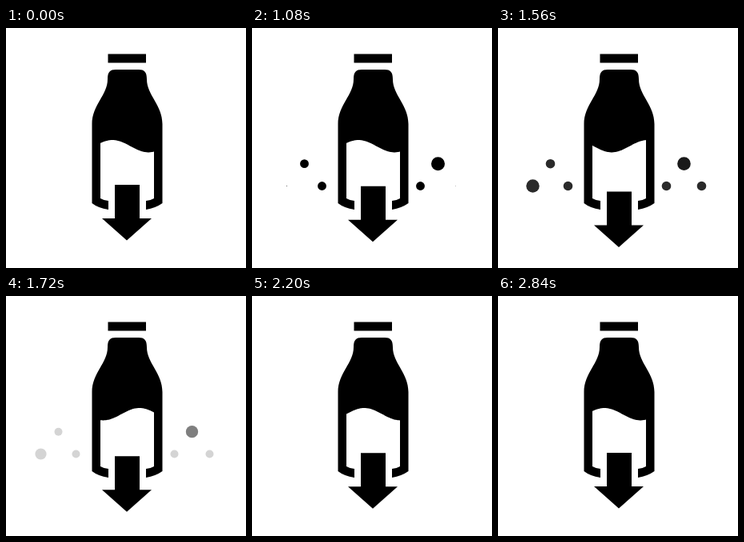
Animation of 300x300 px, one loop 2.88 s. Source, as an HTML page:

```html
<!DOCTYPE html>
<html>
<head>
<meta charset="utf-8">
<style>
  html, body { margin: 0; height: 100%; overflow: hidden; background: #fff; }
  svg { display: block; width: 100%; height: 100%; filter: blur(.6px); }
</style>
</head>
<body>
<svg viewBox="0 0 300 300">
  <rect x="127.5" y="32.5" width="47.5" height="11"/>
  <path id="bottle"/>
  <path id="arrow" d="M136 196H167V238H182L151 265.500L120 238H136Z"/>
  <g id="dots"></g>
</svg>
<script>
const LOOP = 2880, STEP = 40;
const $ = id => document.getElementById(id);
const span = (t, a, b) => Math.min(1, Math.max(0, (t - a) / (b - a)));
const backOut = u => 1 + 2.7 * (u - 1) ** 3 + 1.7 * (u - 1) ** 2;

// Slots 0-2 sit left of the bottle, 3-5 right; the middle of each trio is raised.
const dots = [];
function addDot(slot, r, start, fade, end) {
  const el = document.createElementNS("http://www.w3.org/2000/svg", "circle");
  el.setAttribute("cx", 43.5 + 22 * (slot % 3) + (slot > 2 ? 167 : 0));
  el.setAttribute("cy", slot % 3 === 1 ? 169.7 : 197.5);
  $("dots").append(el);
  dots.push({ el, r, start, fade, end });
}

addDot(0, 6.6, 590, 700, 980);
for (let slot = 0; slot < 6; slot++) {
  const big = slot % 4 === 0, outer = slot % 5 === 0, lead = slot === 4;
  const start = lead ? 745 : outer ? 1076 : 985;
  addDot(slot, big ? 8.5 : 6, start, 1520, lead ? 1920 : 1760);
}

// cubic-bezier(.3, 0, .1, 1), solved by bisection
function glide(u) {
  let lo = 0, hi = 1;
  for (let i = 0; i < 24; i++) {
    const s = (lo + hi) / 2;
    const x = 0.9 * s * (1 - s) ** 2 + 0.3 * s * s * (1 - s) + s ** 3;
    if (x < u) lo = s; else hi = s;
  }
  return lo * lo * (3 - 2 * lo);
}

function bottlePath(crest) {
  let wave = "";
  for (let x = 185; x >= 118; x--) {
    const y = 147.7 - 7.7 * Math.cos((x - crest) / 45 * Math.PI);
    wave += `L${x} ${y.toFixed(2)}`;
  }
  return "M127 64C127 55 130 52 137 52H166C173 52 176 55 176 64" +
    "C176 84 195.500 96 195.500 120V219" +
    "Q187 225 175 227V216Q181 215.500 185 213" + wave +
    "V213Q122 215.500 128 216V227Q115 225 107.500 219V120C107.500 96 127 84 127 64Z";
}

function draw(t) {
  $("bottle").setAttribute("d", bottlePath(223 - 90 * glide(span(t, 1160, 2840))));

  const drop = t < 1320 ? span(t, 600, 1320) ** 6 : (1 - span(t, 1320, 2840)) ** 5;
  $("arrow").setAttribute("transform", `translate(0 ${20 * drop})`);

  for (const { el, r, start, fade, end } of dots) {
    const alpha = 1 - span(t, fade, end);
    const grow = t > start ? backOut(span(t, start, start + 320)) : 0;
    el.setAttribute("r", Math.max(0, r * grow * (0.8 + 0.2 * alpha)));
    el.setAttribute("opacity", alpha);
  }
}

const begin = performance.now();
function tick() {
  const t = (performance.now() - begin) % LOOP;
  draw(Math.floor(t / STEP) * STEP);
  requestAnimationFrame(tick);
}
tick();
</script>
</body>
</html>
```
